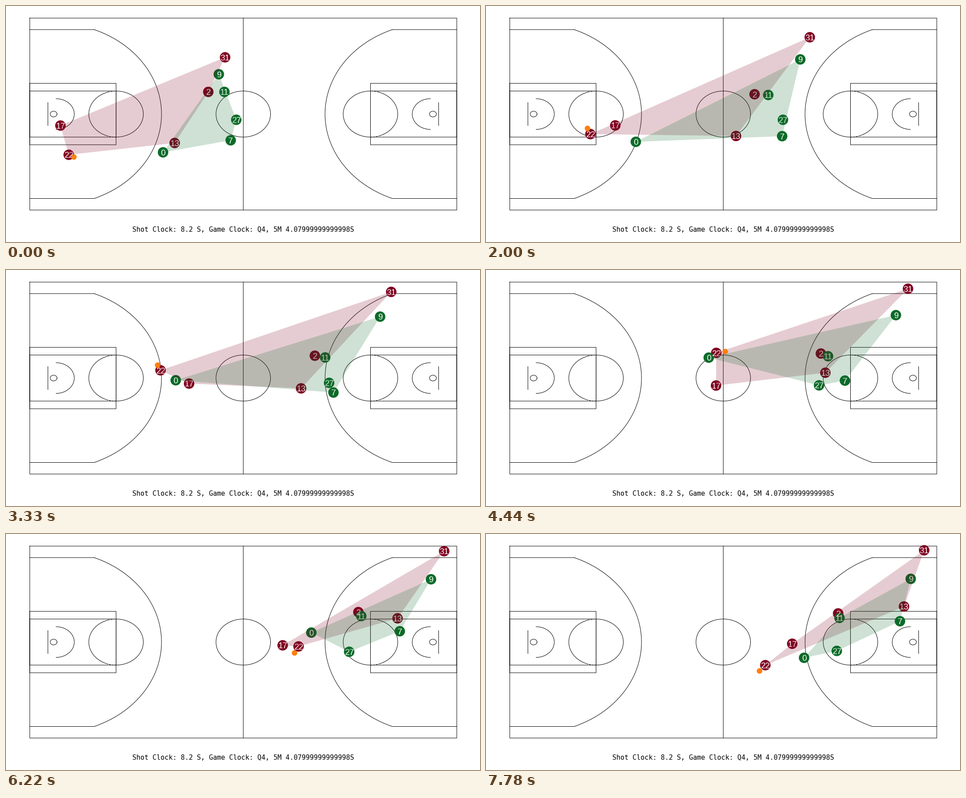
A matplotlib script that plays this animation: 1058 px wide and 529 px high, repeating every 8000 ms.

```python
import numpy as np
import matplotlib.pyplot as plt
from matplotlib.animation import FuncAnimation
from matplotlib.patches import Circle, Polygon

W, H, DPI = 1058, 529, 100
STEPS = 36                      # poses in one loop
FRAMES, INTERVAL = 200, 40      # fine clock, each pose is held for several ticks
RED, GREEN, ORANGE = "#800020", "#0b6b28", "#ff7f0e"
PX = 72 / DPI

# Court: 94 x 50 ft, stretched a little along its length
LEFT, TOP, RIGHT, BOTTOM = 53, 27.1, 1006.2, 457.3
FX, FY = (RIGHT - LEFT) / 94, (BOTTOM - TOP) / 50
MID_X, MID_Y = (LEFT + RIGHT) / 2, (TOP + BOTTOM) / 2


def path(*points):
    """Smooth curve through points that are passed at equal time steps."""
    p = np.array(points, float)
    d = np.diff(p, axis=0)
    inner = (d[1:] + d[:-1]) / 2
    m = np.vstack([1.5 * d[0] - inner[0] / 2, inner, 1.5 * d[-1] - inner[-1] / 2])

    def at(s):
        i = min(int(s * len(d)), len(d) - 1)
        u = s * len(d) - i
        bend = (m[i] - d[i]) * (1 - u) - (m[i + 1] - d[i]) * u
        return p[i] + u * d[i] + u * (1 - u) * bend

    return at


def ease_out(s):
    return 1 - (1 - s) ** 2


def ease_in_out(s):
    return s * s * (3 - 2 * s)


def shadow(leader, start, end, ease):
    """Follow another player while the gap changes from start to end."""
    a, b = np.array(start), np.array(end)
    return lambda s: leader(s) + a + (b - a) * ease(s)


REDS = {
    "31": path((489, 115), (672, 79), (840, 51.5), (953, 41), (978, 38.5), (978, 36.5)),
    "2": path((451.5, 192.5), (567, 198.5), (676, 193), (756, 186), (786.5, 175), (786, 178)),
    "17": path((121.5, 268), (250, 271.5), (388, 255), (531, 259), (617.5, 249.5), (683.5, 246)),
    "13": path((376.5, 307), (523, 297), (640, 271), (775, 224), (874, 189), (933, 162.5)),
    "22": path((140, 333.5), (208, 305), (318, 234), (541, 185), (653, 252), (623.5, 294)),
}
GREENS = {
    "9": shadow(REDS["31"], (-14, 38), (-30, 64), ease_out),
    "11": shadow(REDS["2"], (36, 0), (3, 10), ease_in_out),
    "27": path((514, 255), (636, 256), (714, 252.5), (747, 259.5), (766, 264), (783, 262)),
    "7": shadow(REDS["13"], (125, -6), (-9, 33), ease_in_out),
    "0": path((350.5, 328), (333, 318), (363, 257), (521, 192), (681.5, 221), (710, 277.5)),
}
# The ball swings around the player who dribbles it
SWING = path((11.5, 5), (-2, 7), (-7, -16), (-6.5, -11.5),
             (20, -3), (2, 10), (-14, 16), (-13, 13))


def hull(points):
    """Convex hull by monotone chain."""
    pts = sorted(map(tuple, points))

    def chain(seq):
        out = []
        for x, y in seq:
            while len(out) > 1:
                (ax, ay), (bx, by) = out[-2:]
                if (bx - ax) * (y - ay) - (by - ay) * (x - ax) > 0:
                    break
                out.pop()
            out.append((x, y))
        return out[:-1]

    return chain(pts) + chain(pts[::-1])


fig = plt.figure(figsize=(W / DPI, H / DPI), dpi=DPI, facecolor="white")
ax = fig.add_axes([0, 0, 1, 1])
ax.set_xlim(0, W)
ax.set_ylim(H, 0)
ax.axis("off")


def line(xs, ys, **style):
    ax.plot(xs, ys, color="black", lw=PX, zorder=1, snap=False, **style)


def box(x0, y0, x1, y1):
    line((x0, x1, x1, x0, x0), (y0, y0, y1, y1, y0))


def draw_half(side):
    """One half of the court; side is 1 on the left and -1 on the right."""

    def px(feet):
        return MID_X + side * (feet - 47) * FX

    def arc(cx, r, a0, a1, **style):
        a = np.radians(np.linspace(a0, a1, 181))
        line(px(cx + r * np.cos(a)), MID_Y + r * FY * np.sin(a), **style)

    for half_width in (8, 6):
        box(px(0), MID_Y - half_width * FY, px(19), MID_Y + half_width * FY)

    # Free throw circle, broken where it meets the lane on the basket side
    arc(19, 6, -90, 90)
    arc(19, 6, 107, 253)
    for a0 in (90, 253):
        arc(19, 6, a0, a0 + 17, dashes=(4, 2), dash_capstyle="butt")

    # Three point line
    edge = np.degrees(np.arcsin(22 / 23.75))
    corner = 5.25 + np.sqrt(23.75 ** 2 - 22 ** 2)
    arc(5.25, 23.75, -edge, edge)
    for dy in (-22, 22):
        line((px(0), px(corner)), (MID_Y + dy * FY,) * 2)

    # Hoop, backboard and restricted area
    arc(5.25, 0.75, 0, 360)
    arc(5.8, 4, -90, 90)
    line((px(4),) * 2, (MID_Y - 3 * FY, MID_Y + 3 * FY))


box(LEFT, TOP, RIGHT, BOTTOM)
line((MID_X, MID_X), (TOP, BOTTOM))
turn = np.linspace(0, 2 * np.pi, 241)
line(MID_X + 6 * FX * np.cos(turn), MID_Y + 6 * FY * np.sin(turn))
for side in (1, -1):
    draw_half(side)

clock = "Shot Clock: 8.2 S, Game Clock: Q4, 5M 4.07" + "9" * 11 + "8S"
ax.text(529.7, 505.5, clock, family="DejaVu Sans Mono", size=15 * PX,
        ha="center", va="baseline", color="black")


class Team:
    def __init__(self, paths, color, z):
        self.paths = list(paths.values())
        self.dots = [ax.add_patch(Circle((0, 0), 11.7, fc=color, lw=0, zorder=z))
                     for _ in paths]
        self.labels = [ax.text(0, 0, n, family="Liberation Sans", size=18.7 * PX,
                               color="white", ha="center", va="baseline", zorder=4)
                       for n in paths]
        self.area = ax.add_patch(Polygon([(0, 0)] * 3, closed=True, fc=color,
                                         alpha=0.2, lw=0, zorder=z + 3))

    def place(self, s):
        spots = [at(s) for at in self.paths]
        for dot, label, (x, y) in zip(self.dots, self.labels, spots):
            dot.center = x, y
            label.set_position((x, y + 6.8))
        self.area.set_xy(hull(spots))
        return [*self.dots, *self.labels, self.area]


teams = [Team(REDS, RED, 2), Team(GREENS, GREEN, 3)]
ball = ax.add_patch(Circle((0, 0), 6.2, fc=ORANGE, lw=0, zorder=8))


def update(frame):
    # Poses change on the tick nearest to their start
    step = int((frame + 0.75) * STEPS / FRAMES)
    s = step / (STEPS - 1)
    ball.center = tuple(REDS["22"](s) + SWING(s))
    return [a for team in teams for a in team.place(s)] + [ball]


anim = FuncAnimation(fig, update, frames=FRAMES, interval=INTERVAL,
                     repeat=True, repeat_delay=0, blit=False)
plt.show()
```
